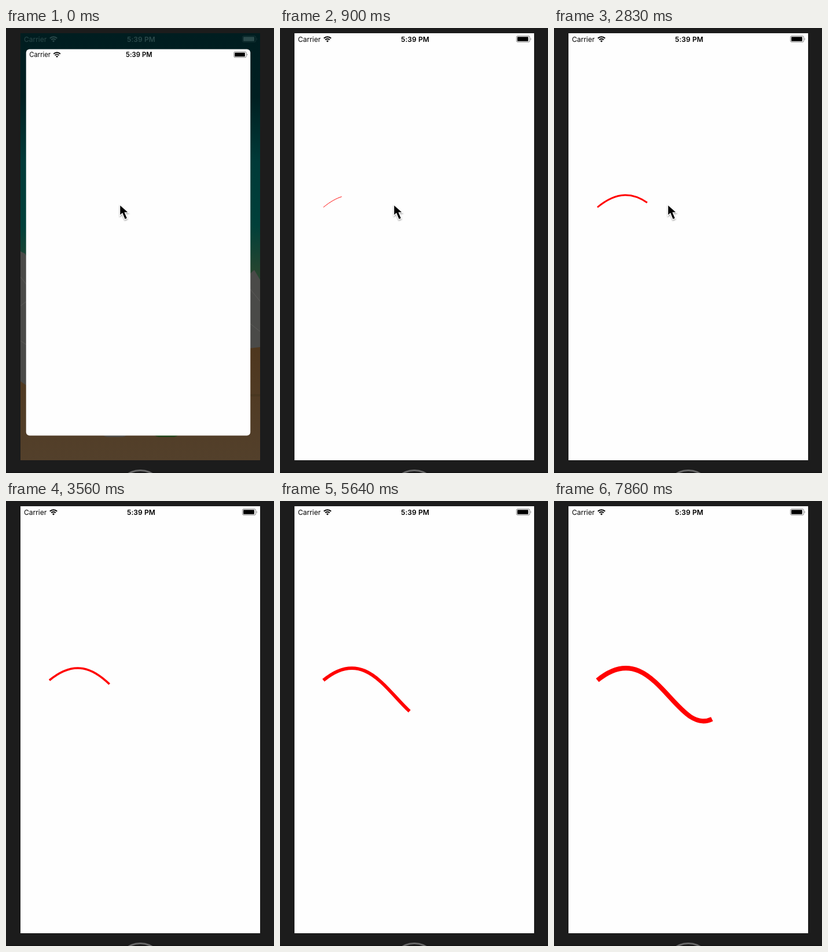
Write an HTML page that moves like this. It is 463 by 767 pixels and loops after 8 s.

```html
<!DOCTYPE html>
<html lang="en">
<head>
<meta charset="utf-8">
<title>Growing stroke</title>
<style>
  html, body { margin: 0; width: 100%; height: 100%; overflow: hidden; background: #1c1c1c; }
  svg { display: block; width: 463px; height: 767px; }
  text { font: 12px Inter, "Open Sans", sans-serif; }
  .clock { font-weight: 600; letter-spacing: .1px; }
</style>
</head>
<body>
<svg viewBox="0 0 463 767">
  <defs>
    <linearGradient id="sea" x1="0" y1="0" x2="0" y2="1">
      <stop offset="0" stop-color="#001d20"/>
      <stop offset=".15" stop-color="#001f21"/>
      <stop offset=".3" stop-color="#003a38"/>
      <stop offset=".45" stop-color="#00403a"/>
      <stop offset=".56" stop-color="#26452f"/>
    </linearGradient>
    <linearGradient id="sand" x1="0" y1="0" x2="0" y2="1">
      <stop offset="0" stop-color="#4e371e"/>
      <stop offset="1" stop-color="#53402b"/>
    </linearGradient>
    <clipPath id="screen"><rect width="414" height="736"/></clipPath>
    <filter id="shadow" x="-50%" y="-50%" width="200%" height="200%">
      <feDropShadow dx="0" dy="1.5" stdDeviation="1.2" flood-opacity=".4"/>
    </filter>
    <g id="status">
      <text x="6" y="14.6">Carrier</text>
      <text class="clock" x="208.5" y="14.6" text-anchor="middle">5:39 PM</text>
      <g fill="none" stroke="currentColor" stroke-width="2.1">
        <path d="M50.8 8.7A9 9 0 0 1 63.2 8.7"/>
        <path d="M53.2 11.3A5.4 5.4 0 0 1 60.8 11.3"/>
      </g>
      <path d="M57 15.4L54.9 13.2A3 3 0 0 1 59.1 13.2Z"/>
      <rect x="383.5" y="4.8" width="23" height="10.4" rx="2.3" fill="none" stroke="currentColor" stroke-opacity=".5"/>
      <rect x="385" y="6.3" width="19" height="7.4" rx="1"/>
      <path d="M407.8 8.2Q410 10 407.8 11.8Z" opacity=".5"/>
    </g>
  </defs>

  <rect width="463" height="767" fill="#1c1c1c"/>
  <rect y="765" width="463" height="2" fill="#151515"/>
  <circle cx="232" cy="802.5" r="40" fill="#191919" stroke="#686868" stroke-width="3"/>

  <g id="home" transform="translate(25 9)" clip-path="url(#screen)">
    <rect width="414" height="736" fill="url(#sea)"/>
    <path d="M0 376L8 380 18 400 396 415 404 408 414 425V736H0Z" fill="#4a4a48"/>
    <path d="M0 600L12 608 396 543 414 541V736H0Z" fill="url(#sand)"/>
    <path d="M0 420l12 15M0 470l12 -9M0 530l12 8M396 440l18 22M396 500l18 14" stroke="#5c5a58" fill="none"/>
    <path d="M396 622H414V626H396Z" fill="#493720"/>
    <rect x="140" y="640" width="46" height="56" rx="10" fill="#4e4b47"/>
    <rect x="229" y="640" width="46" height="56" rx="10" fill="#214217"/>
    <use href="#status" fill="#2b4a4b" color="#2b4a4b"/>
  </g>

  <rect id="card" fill="#fefefe"/>
  <g id="app">
    <use href="#status" fill="#000" color="#000"/>
    <path id="curve" fill="none" stroke="#f00"/>
  </g>

  <path id="cursor" d="M196.6 304.6V323.4L200.9 319.6 205.2 330 209.7 328.2 205.4 318.1H211.8Z"
        fill="#000" stroke="#fff" stroke-width="1.3" filter="url(#shadow)"/>
</svg>
<script>
const LOOP = 8000, STEP = 148.25;
const DRAW_MS = 9823, LEAD_MS = 30, MAX_WIDTH = 10;
const CURSOR_STEPS = 21;
const curvePoints = [[50, 300], [171, 200], [200, 500], [300, 300]];

// Launch poses of the app window: x, y, width, height, corner radius
const poses = [
  [34.7, 36.5, 387.5, 666, 6],
  [25.8, 11.6, 411.7, 729.6, 1],
  [25, 9, 414, 736, 0]
];

const el = id => document.getElementById(id);
const set = (id, attrs) => {
  for (const name in attrs) el(id).setAttribute(name, attrs[name]);
};
const mix = (a, b, u) => a.map((v, i) => v + (b[i] - v) * u);

// Part of the cubic from its start to parameter u
function partialCurve([a, b, c, d], u) {
  const ab = mix(a, b, u), bc = mix(b, c, u), cd = mix(c, d, u);
  const abc = mix(ab, bc, u), bcd = mix(bc, cd, u);
  return `M${a}C${ab} ${abc} ${mix(abc, bcd, u)}`;
}

function render(time) {
  const step = Math.floor(time / STEP);
  const u = (step * STEP + LEAD_MS) / DRAW_MS;
  const [x, y, width, height, rx] = poses[Math.min(step, 2)];
  set('card', { x, y, width, height, rx });
  set('app', { transform: `translate(${x} ${y}) scale(${width / 414})` });
  set('home', { visibility: step < 2 ? 'visible' : 'hidden' });
  set('cursor', { visibility: step < CURSOR_STEPS ? 'visible' : 'hidden' });
  set('curve', {
    d: partialCurve(curvePoints, u),
    'stroke-width': MAX_WIDTH * u,
    visibility: step > 0 ? 'visible' : 'hidden'
  });
}

const start = performance.now();
function tick() {
  render((performance.now() - start) % LOOP);
  requestAnimationFrame(tick);
}
tick();
</script>
</body>
</html>
```
